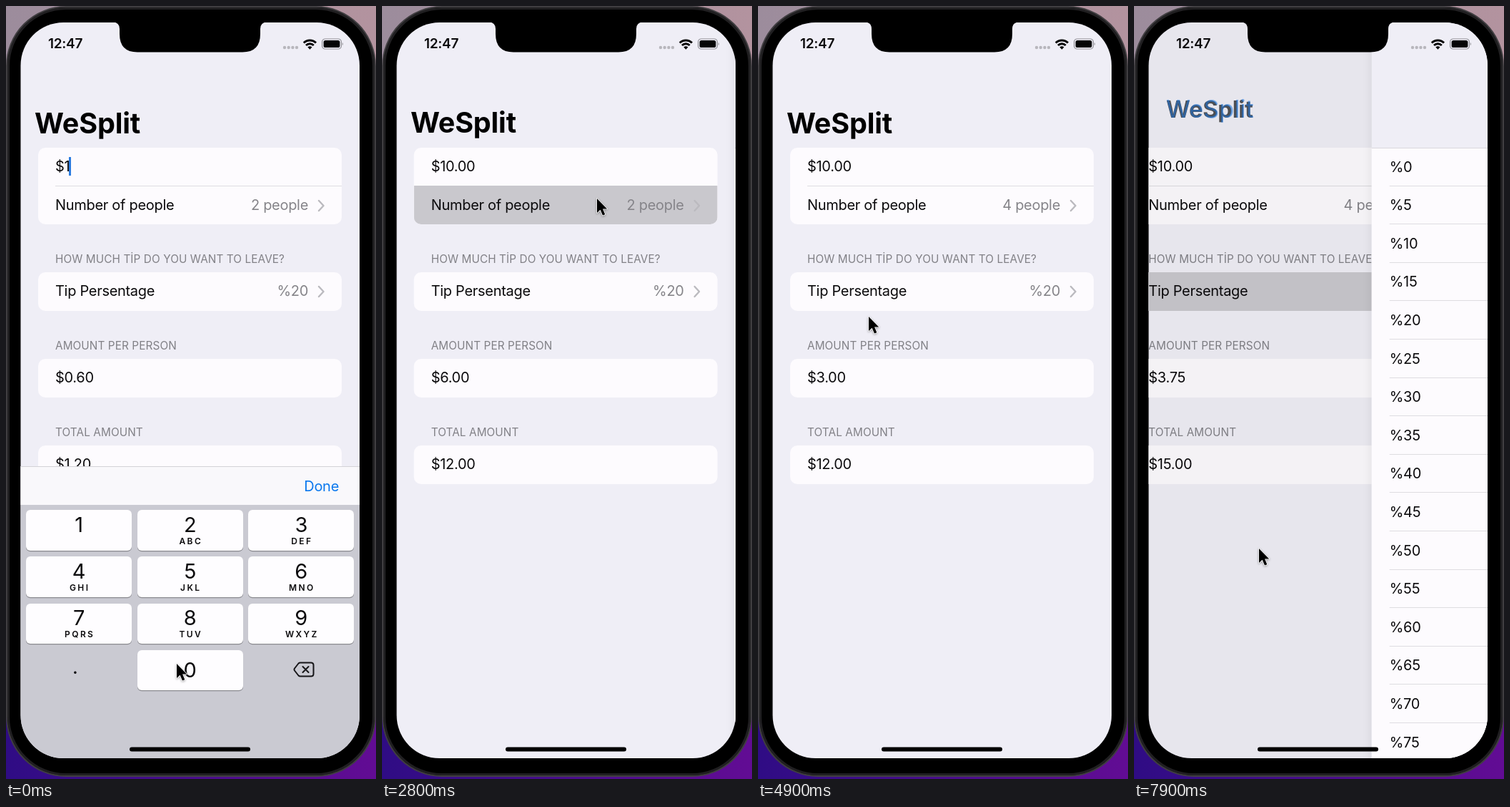
Recreate the animation shown at these times as an HTML page. Size 518 px wide and 1080 px high, loop 8000 ms.

```html
<!DOCTYPE html>
<html lang="en">
<head>
<meta charset="utf-8">
<title>Bill splitter</title>
<style>
  html, body { margin: 0; width: 100%; height: 100%; overflow: hidden; background: #000; }
  body { position: relative; font: 400 20px/53.6px Inter, "Open Sans", sans-serif; letter-spacing: -.015em; color: #0b0a0c; }
  div, svg { position: absolute; white-space: nowrap; }
  #stage { left: 0; top: 0; width: 518px; height: 1080px; overflow: hidden; }
  .fill { inset: 0; }
  .wall { inset: 0; background: linear-gradient(90deg, #9c8c9c, #b3939f) 0 0 / 100% 110px no-repeat, linear-gradient(90deg, #2f0c84, #620c94); }
  .phone { left: 0; top: 0; width: 514px; height: 1073px; border: 2px solid #403e41; border-radius: 84px; background: #000; box-shadow: inset 0 0 0 3px #201f21; }
  #screen { inset: 0; clip-path: inset(23px 23px 29px 20.5px round 60px); background: #efeef6; }
  #strip { left: 0; top: 1010px; width: 518px; height: 70px; background: #fdfdfd; }

  .card { left: 45px; width: 425px; height: 53.5px; border-radius: 10px; background: #fdfbfe; overflow: hidden; }
  .card.two { height: 107px; }
  .label { left: 24px; }
  .value { right: 47px; color: #858489; }
  .press { left: 0; width: 100%; height: 53.6px; background: #c9c8cd; opacity: 0; }
  .rule { right: 0; height: 1px; background: #dedde1; }
  .head { left: 69px; font-size: 15.3px; line-height: 20px; letter-spacing: .1px; color: #818086; }
  .chev { right: 24px; top: 18px; }
  .chev path { fill: none; stroke: #bbbabf; stroke-width: 2.4; stroke-linecap: round; stroke-linejoin: round; }
  #caret { display: inline-block; width: 2.4px; height: 26px; margin-left: -1px; vertical-align: -6px; background: #2a7be0; }
  #dim { inset: 0 -143px 0 0; background: #000; }

  .list { left: 20px; top: 0; width: 475px; height: 1080px; background: #efeef6; box-shadow: 0 0 14px rgba(0,0,0,.09); }
  .rows { top: 197.5px; left: 0; right: 0; bottom: 0; background: #fdfbfe; border-top: 1px solid #d9d8dd; box-sizing: border-box; }
  .rows .label { left: 25px; }
  .check { left: 426px; }

  .title { left: 0; top: 0; line-height: 50px; margin-top: -25px; transform-origin: 0 50%; letter-spacing: -.004em; }
  #big { font-size: 39.5px; font-weight: 700; color: #000; }
  #back { color: #1a76e0; }
  #arrow { left: 0; top: 0; margin-top: -11px; }

  #keyboard { left: 0; top: 643px; width: 518px; height: 437px; background: #cacad2; }
  .bar { left: 0; top: 0; width: 518px; height: 54px; background: #f9f8fb; border-top: 1px solid #d3d2d7; box-sizing: border-box; }
  .done { right: 52px; top: 1px; color: #0a78ee; }
  .dot { left: 93px; top: 261px; font-size: 27px; line-height: 40px; }
  .key { width: 148px; height: 56.5px; border-radius: 6px; background: #fefdff; box-shadow: 0 1.3px 0 #8b8b90; text-align: center; }
  .key b, .key i { position: absolute; left: 0; width: 100%; font-style: normal; }
  .key b { font-size: 29px; font-weight: 400; line-height: 40px; top: .5px; }
  .key i { font-size: 12px; font-weight: 600; line-height: 16px; top: 35.5px; letter-spacing: 2.4px; text-indent: 2.4px; }
  .clock { left: 59px; top: 38px; line-height: 30px; font-size: 19px; font-weight: 600; }
  #mouse path { fill: #000; stroke: #fff; stroke-width: 1.6; stroke-linejoin: round; paint-order: stroke; filter: drop-shadow(0 1.5px 1.5px rgba(0,0,0,.35)); }
</style>
</head>
<body>
<div id="stage">
  <div class="wall"></div>
  <div class="phone"></div>
  <div id="screen">
    <div id="main" class="fill">
      <div class="card two" style="top:198px">
        <div id="pressPeople" class="press" style="top:53.4px"></div>
        <div class="label"><span id="bill"></span><span id="caret"></span></div>
        <div id="split" class="rule" style="left:24px;top:52.5px"></div>
        <div class="label" style="top:53.6px">Number of people</div>
        <div id="people" class="value" style="top:53.6px"></div>
        <svg class="chev" style="top:71.6px" width="10" height="18"><path d="M2 2L8.5 9L2 16"/></svg>
      </div>
      <div class="head" style="top:344px">HOW MUCH TİP DO YOU WANT TO LEAVE?</div>
      <div class="card" style="top:372px">
        <div id="pressTip" class="press"></div>
        <div class="label">Tip Persentage</div>
        <div id="tip" class="value"></div>
        <svg class="chev" width="10" height="18"><path d="M2 2L8.5 9L2 16"/></svg>
      </div>
      <div class="head" style="top:465px">AMOUNT PER PERSON</div>
      <div class="card" style="top:493px"><div id="share" class="label"></div></div>
      <div class="head" style="top:586px">TOTAL AMOUNT</div>
      <div class="card" style="top:614px"><div id="total" class="label"></div></div>
      <div id="dim"></div>
    </div>
    <div id="strip"></div>
    <div id="peopleList" class="list"></div>
    <div id="tipList" class="list"></div>
    <div id="big" class="title">WeSplit</div>
    <div id="back" class="title">WeSplit</div>
    <svg id="arrow" width="16" height="22"><path d="M12 1.5L2.5 11L12 20.5" fill="none" stroke="#1a76e0" stroke-width="2.9" stroke-linecap="round" stroke-linejoin="round"/></svg>
    <div id="keyboard">
      <div class="bar"><div class="done">Done</div></div>
      <svg style="left:402px;top:273px" width="30" height="22" fill="none" stroke="#161518" stroke-width="2" stroke-linecap="round" stroke-linejoin="round"><path d="M10 1.5H25Q28.5 1.5 28.5 5V17Q28.5 20.5 25 20.5H10Q8.5 20.5 7.5 19.5L2 12.5Q1 11 2 9.5L7.5 2.5Q8.5 1.5 10 1.5ZM13.5 7L21.5 15M21.5 7L13.5 15"/></svg>
      <div class="dot">.</div>
    </div>
    <div class="clock">12:47</div>
    <svg class="fill" width="518" height="1080">
      <g fill="#b8b7bd"><circle cx="390" cy="58" r="2.2"/><circle cx="395.7" cy="58" r="2.2"/><circle cx="401.4" cy="58" r="2.2"/><circle cx="407" cy="58" r="2.2"/></g>
      <g fill="none" stroke="#050505" stroke-width="2.9"><path d="M416.8 51.5A12.2 12.2 0 0 1 434 51.5"/><path d="M420 55A7.7 7.7 0 0 1 430.8 55"/></g>
      <path d="M422.3 57.5Q425.4 55 428.5 57.5L425.4 60.8Z" fill="#050505"/>
      <rect x="442.6" y="46" width="26.8" height="14" rx="4.3" fill="none" stroke="#919096" stroke-width="1.2"/>
      <rect x="444.6" y="48" width="22.8" height="10" rx="2.6" fill="#050505"/>
      <path d="M470.8 50.7Q473 53 470.8 55.3Z" fill="#919096"/>
      <rect x="173" y="1035.5" width="169" height="6" rx="3" fill="#000"/>
    </svg>
  </div>
  <svg class="fill" width="518" height="1080">
    <path d="M150 22.5Q159 23 159 32V39Q159 64.5 184 64.5H331Q356 64.5 356 39V32Q356 23 365 22.5Z" fill="#000"/>
    <g id="mouse"><path d="M0 0V20L4.6 15.8L8 23.6L11.3 22.2L8.1 14.5H14.2Z"/></g>
  </svg>
</div>
<script>
const LOOP = 8000, ROW = 53.6, WIDTH = 475;
const KEY_DOWN = 260, KEY_UP = 400, DONE = 1500;
const el = Object.fromEntries([...document.querySelectorAll('[id]')].map(e => [e.id, e]));

// Each visit: row press, push, option press, pop, chosen rows before and after
const visits = [
  { list: el.peopleList, row: el.pressPeople, press: 2680, push: 2796, tap: 3900, pop: 4110, from: 0, to: 2 },
  { list: el.tipList, row: el.pressTip, press: 5420, push: 5531, tap: 7540, pop: 7740, from: 4, to: 10 }
];

// Pointer stops: time, x, y
const stops = [
  [0, 239, 919], [450, 239, 919], [1150, 446, 658], [2050, 446, 658],
  [2650, 301, 269], [2850, 301, 269], [3100, 274, 275], [3700, 162, 333],
  [4250, 162, 333], [4700, 155, 434], [4900, 155, 434], [5400, 235, 399],
  [5850, 235, 399], [7200, 175, 758], [8000, 175, 758]
];

const clamp = v => Math.min(1, Math.max(0, v));
const smooth = v => v * v * (3 - 2 * v);
const spring = ms => ms <= 0 ? 0 : 1 - (1 + ms * .014) * Math.exp(-ms * .014);
const money = v => '$' + v.toFixed(2);
const show = (e, on) => e.style.visibility = on ? 'visible' : 'hidden';
const move = (e, x, y, s = 1) => e.style.transform = `translate(${x}px,${y}px) scale(${s})`;
const setText = (e, s) => { if (e.textContent !== s) e.textContent = s; };

function buildList(visit, name) {
  let html = '<div class="rows"><div class="press"></div>';
  for (let i = 0; i < 17; i++) {
    html += `<div class="label" style="top:${i * ROW}px">${name(i)}</div>` +
      `<div class="rule" style="left:25px;top:${(i + 1) * ROW - 1.5}px"></div>`;
  }
  visit.list.innerHTML = html + '<svg class="check" width="22" height="22"><path d="M2 12L7.5 18.5L18 3" fill="none" stroke="#0f70e6" stroke-width="2.8" stroke-linecap="round" stroke-linejoin="round"/></svg></div>';
  visit.shade = visit.list.querySelector('.press');
  visit.check = visit.list.querySelector('.check');
  visit.shade.style.top = visit.to * ROW - 1 + 'px';
}
buildList(visits[0], i => i + 2 + ' people');
buildList(visits[1], i => '%' + i * 5);

const letters = ['', 'ABC', 'DEF', 'GHI', 'JKL', 'MNO', 'PQRS', 'TUV', 'WXYZ'];
function addKey(digit, col, row, sub) {
  const key = document.createElement('div');
  key.className = 'key';
  key.style.left = 28 + col * 155.6 + 'px';
  key.style.top = 61 + row * 65.3 + 'px';
  key.innerHTML = `<b>${digit}</b><i>${sub}</i>`;
  el.keyboard.append(key);
  return key;
}
letters.forEach((sub, i) => addKey(i + 1, i % 3, Math.floor(i / 3), sub));
const zero = addKey(0, 1, 3, '');
zero.firstChild.style.top = '8px';

function drawForm(t) {
  const bill = t < KEY_DOWN ? 1 : 10;
  const people = t < visits[0].pop ? 2 : 4;
  const tip = t < visits[1].pop ? 20 : 50;
  const total = bill * (1 + tip / 100);
  setText(el.bill, t < DONE ? '$' + bill : money(bill));
  setText(el.people, people + ' people');
  setText(el.tip, '%' + tip);
  setText(el.share, money(total / people));
  setText(el.total, money(total));
  el.caret.style.opacity = t < DONE && t % 1000 < 600 ? 1 : 0;
}

function drawKeyboard(t) {
  move(el.keyboard, 0, 422 * spring(t - DONE));
  show(el.keyboard, t < DONE + 600);
  show(el.strip, t >= DONE && t < DONE + 620);
  zero.style.background = t >= KEY_DOWN && t < KEY_UP ? '#b4b6c0' : '';
}

function drawTitle(cover) {
  const x = 41 + 15 * cover, y = 163.5 - 56 * cover, width = 147 - 77 * cover;
  move(el.big, x - 1, y, width / 147);
  move(el.back, x - 1, y, width / 70);
  el.big.style.opacity = 1 - cover;
  el.back.style.opacity = clamp(cover * 1.6);
  move(el.arrow, 31 + 100 * (1 - cover), y);
  el.arrow.style.opacity = clamp((cover - .9) / .1);
}

function drawVisits(t) {
  let cover = 0;
  for (const v of visits) {
    const popping = t >= v.pop;
    let p = popping ? 1 - spring(t - v.pop) : spring(t - v.push);
    if (p < .002) p = 0;
    if (p > .998) p = 1;
    show(v.list, p > 0);
    move(v.list, WIDTH * (1 - p), 0);
    v.shade.style.opacity = t >= v.tap && !popping ? 1 : 0;
    v.check.style.top = (popping ? v.to : v.from) * ROW + 15.5 + 'px';
    v.row.style.opacity = t < v.press ? 0 : popping ? 1 - clamp((t - v.pop - 200) / 380) : 1;
    cover = Math.max(cover, p);
  }
  el.split.style.opacity = 1 - el.pressPeople.style.opacity;
  move(el.main, -.3 * WIDTH * cover, 0);
  el.dim.style.opacity = .105 * cover;
  drawTitle(cover);
}

function drawMouse(t) {
  const i = stops.findIndex(s => s[0] > t);
  const [t0, x0, y0] = stops[i - 1], [t1, x1, y1] = stops[i];
  const k = smooth((t - t0) / (t1 - t0));
  el.mouse.setAttribute('transform', `translate(${x0 + (x1 - x0) * k} ${y0 + (y1 - y0) * k})`);
}

const start = performance.now();
function frame() {
  const t = (performance.now() - start) % LOOP;
  drawForm(t);
  drawKeyboard(t);
  drawVisits(t);
  drawMouse(t);
  requestAnimationFrame(frame);
}
frame();
</script>
</body>
</html>
```
